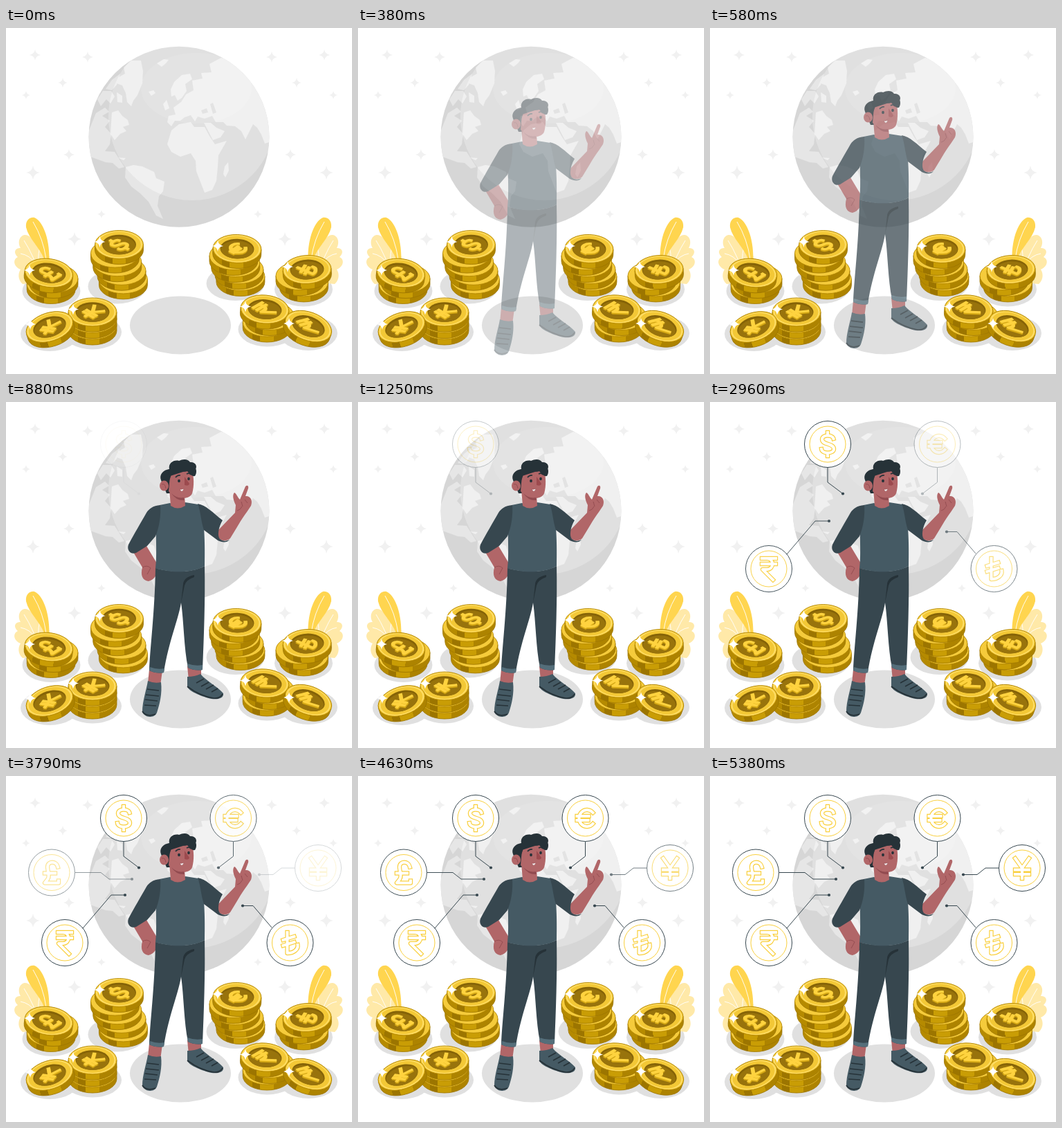
An HTML page that plays this animation: 500 px wide and 500 px high, repeating every 5.5 s.

```html
<!DOCTYPE html>
<html lang="en">
<head>
<meta charset="utf-8">
<title>World currencies</title>
<style>
html, body { margin: 0; width: 100%; height: 100%; overflow: hidden; background: #fff; }
svg { display: block; width: 100vw; height: 100vh; }
</style>
</head>
<body>
<svg viewBox="0 0 500 500">
  <defs>
    <clipPath id="ball"><circle cx="250" cy="157.300" r="130.500"/></clipPath>
    <linearGradient id="side">
      <stop offset=".2" stop-color="#b58a00"/>
      <stop offset=".2" stop-color="#9c7500"/><stop offset=".36" stop-color="#9c7500"/>
      <stop offset=".36" stop-color="#c99d05"/><stop offset=".64" stop-color="#c99d05"/>
      <stop offset=".64" stop-color="#ad8300"/>
    </linearGradient>
    <marker id="dot" viewBox="-3 -3 6 6" markerWidth="6" markerHeight="6"><circle r="2.100" fill="#37474f"/></marker>
    <g id="leaf">
      <path d="M24 370C16 363 18 353 21 349C10 344 10 334 17 331C10 324 13 318 21 318C16 309 20 300 27 299C35 299 39 306 42 312C49 307 56 314 53 322C63 324 66 335 60 342L62 366Z" fill="#ffe9a8"/>
      <path d="M26 307Q40 329 50 360M21 326Q34 328 43 341M50 314Q46 324 47 340" fill="none" stroke="#fff" stroke-width=".9"/>
      <path d="M55 334C49 317 33 305 29 288C28 278 34 273 41 274C52 278 63 302 62.500 334Z" fill="#ffd54f"/>
      <path d="M39 280Q54 305 58 334" fill="none" stroke="#fff" stroke-width=".9"/>
    </g>
  </defs>
  <g id="stars"></g>
  <g clip-path="url(#ball)">
    <rect x="119" y="26" width="263" height="263" fill="#e0e0e0"/>
    <path fill="#f0f0f0" d="M161 72L172 66L170 57L181 47L195 47L198 62L197 80L190 97L184 105L181 113L175 107L173 94L168 83L160 80Z
      M218 51L228 45L235 46L231 51L225 56ZM206 92L213 90L216 94L210 98ZM144 88L153 75L165 66L160 82L153 90Z
      M132 103L140 91L152 91L157 99L151 109L145 103L137 113ZM160 93L168 98L168 108L161 107Z
      M153 122L162 119L168 127L176 133L178 140L169 143L174 149L165 153L157 162L151 153Z
      M119 150L130 123L143 115L149 121L139 127L150 134L143 143L152 153L150 168L143 178L157 179L171 201L163 203L154 195L144 194L119 185Z
      M160 187L173 188L170 191ZM173 201L184 198L197 200L214 208L217 217L229 222L227 236L221 243L219 257L227 276L217 271L206 251L194 239L181 229L172 216Z
      M238 89L243 78L254 68L266 66L269 74L259 81L261 91L254 101L248 105L244 97L239 99ZM227 110L232 104L236 116L230 119Z
      M233 136L235 127L245 125L242 115L253 107L260 96L271 90L269 76L284 73L282 65L297 64L294 52L311 43L340 50L390 110L383 164L374 167L369 154L363 144L357 139L351 151L346 161L340 149L331 142L319 141L314 136L303 136L298 127L287 131L277 128L273 135L267 126L258 129L252 134L244 134L239 142Z
      M239 148L250 139L267 136L272 143L287 143L294 156L302 168L319 163L307 184L306 201L304 221L298 234L287 238L280 220L275 207L274 192L267 181L252 186L239 179L233 168Z
      M286 137L296 137L304 144L316 149L310 158L299 162ZM321 194L322 206L317 216L314 211L316 200Z"/>
    <path d="M282 119L290 116L292 122L284 124ZM295 110L299 108L304 122L299 124Z" fill="#e0e0e0"/>
    <path d="M119 26H382V289H119ZM148 128A121 121 0 0 0 390 128A121 121 0 0 0 148 128Z" fill="#000" opacity=".045" fill-rule="evenodd"/>
    <ellipse cx="275" cy="87" rx="80" ry="51" fill="#fff" opacity=".1"/>
  </g>
  <ellipse cx="252" cy="429.500" rx="73" ry="42" fill="#e0e0e0"/>
  <g id="shadows" fill="#e0e0e0"></g>
  <use href="#leaf"/>
  <use href="#leaf" transform="translate(499) scale(-1 1)"/>
  <g id="coins"></g>
  <g id="badges"></g>
  <g id="man" opacity="0">
    <g fill="#b16668">
      <path d="M207 386L226 388L223 410L205 407ZM262 382L282 382L282 399L264 402Z"/>
      <path d="M184 217L203 208L218 233C222 244 217 256 206 259C197 258 194 250 197 239Z"/>
      <path d="M306 186L331 160L332 149C328 141 327 134 330 131C333 132 334 137 338 141L346 122C349 119 351 122 350 125L346 136C353 135 357 142 354 150L348 159C339 171 333 183 324 197C318 203 306 200 306 193Z"/>
    </g>
    <path d="M197 239Q204 235 209 240L204 249M340 144L342 151M345 141L349 146M334 157Q339 156 341 151" fill="none" stroke="#924b50" stroke-width=".9"/>
    <path d="M205 403Q214 407 224 405C226 421 222 437 218 449C214 458 200 456 197 448C197 432 203 416 205 403ZM262 397Q273 397 281 393C290 404 306 411 314 421C315 429 305 430 297 429C284 426 266 419 262 412Z" fill="#455a64"/>
    <path d="M204 415L221 417M202 423L221 425M201 430L219 432M200 438L217 439M275 406L286 400M282 411L293 405M289 415L300 409M297 419L306 414M262 411Q280 425 300 428Q309 429 313 422M197 447Q203 456 216 451" fill="none" stroke="#263238" stroke-width="1.700"/>
    <path d="M216 240C236 246 267 248 287 237C288 285 286 340 284 387Q273 389 263 384C257 355 257 317 253 290C249 315 235 346 228 391Q217 393 207 388C208 356 215 305 216 240Z" fill="#37474f"/>
    <path d="M208 383Q218 387 229 385L228 391Q217 393 207 388ZM262 378Q273 382 284 380V387Q273 389 263 384Z" fill="#546e7a"/>
    <path d="M272 250Q257 253 256 263L253 290L258 265Q260 257 272 253Z" fill="#263238"/>
    <path d="M222 149L237 146Q249 153 259 145L278 148C286 156 288 195 287 237C269 248 235 247 216 240C219 220 215 180 218 157Z" fill="#455a64"/>
    <path d="M223 149C212 150 207 154 203 160C195 174 185 191 177 206C174 214 180 221 188 218L204 208L216 194C222 180 224 163 223 149ZM277 147C289 149 299 160 313 171C307 181 305 193 309 198Q315 203 323 199C319 204 312 203 306 200L286 185C282 174 281 156 277 147Z" fill="#37474f"/>
    <path d="M224 113C221 105 227 98 236 97C234 88 243 83 250 85C256 82 263 82 266 87C273 86 277 92 274 97L266 112L240 132L232 132Z" fill="#263238"/>
    <g fill="#b16668">
      <path d="M236 126L258 135L259 150Q248 157 238 150Z"/>
      <path d="M237 107L268 97C272 107 272 122 269 132C266 140 253 141 243 136L235 129Z"/>
      <ellipse cx="228.500" cy="121" rx="6.500" ry="7.500"/>
    </g>
    <path d="M239 132Q247 140 257 138L258 142Q246 143 239 132Z" fill="#924b50"/>
    <path d="M235 116L234 98L262 86L271 93C276 95 276 103 273 107C269 108 265 104 262 100C256 103 253 96 247 101C243 103 239 102 238 108Z" fill="#263238"/>
    <path d="M258 108L265 118Q264 122 258 120Z" fill="#9c4a4e"/>
    <path d="M225 119Q230 117 231 125" fill="none" stroke="#924b50"/>
    <path d="M245 109Q248 105 252 106M261 104Q265 102 267 105" fill="none" stroke="#263238" stroke-width="1.700"/>
    <ellipse cx="250" cy="114" rx="1.900" ry="2.300" fill="#263238"/>
    <ellipse cx="264" cy="111" rx="1.800" ry="2.200" fill="#263238"/>
    <path d="M251 126Q254 127 257 125Q256 130 253 129Z" fill="#fff" stroke="#924b50" stroke-width=".6"/>
  </g>
</svg>
<script>
const LOOP = 5500, RISE = 880, FADE = 1800, FIRST = 830, STEP = 535;
const $ = id => document.getElementById(id);

const signs = {
  dollar: 'M8.500 -8C7 -14 -8 -14.500 -8 -7C-8 1.500 9 -2 9 7C9 14 -8 14.500 -9 7M0 -17V-13M0 13V17',
  euro: 'M11 -8A11.500 12 0 1 0 11 8M-12 -3H5M-12 3H4',
  pound: 'M9 -8C7 -17 -6 -17 -6 -8C-6 -2 -2 5 -6 10L-10 15H10V12M-10 1H5',
  yen: 'M-10 -14L0 0L10 -14M0 0V15M-10 2.500H10M-10 9H10',
  rupee: 'M-10 -15H10M-10 -7H10M-10 -15H-3C8 -15 8 1 -3 1H-9L6 16',
  lira: 'M-4 -15V15C6 15 12 9 11 3M-10 -4L6 -9M-10 4L6 -1'
};

const sign = (name, color, width) =>
  `<path d="${signs[name]}" fill="none" stroke="${color}" stroke-width="${width}" stroke-linecap="square" stroke-linejoin="round"/>`;

const spark = (x, y, r, fill) =>
  `<path transform="translate(${x} ${y}) scale(${r})" fill="${fill}" d="M0 -1Q.13 -.13 1 0Q.13 .13 0 1Q-.13 .13 -1 0Q-.13 -.13 0 -1Z"/>`;

// The right half of the sky mirrors the left one.
const sky = [[42, 39, 8], [118, 42, 8], [82, 79, 7], [29, 97, 6], [91, 183, 8], [39, 209, 10], [138, 269, 6], [99, 305, 10]];
$('stars').innerHTML = sky.map(([x, y, r]) =>
  spark(x, y, r, '#f1f1f1') + spark(502 - x, y, r, '#f1f1f1')).join('');

function coin(x, y, name, tilt = 0, spin = 0) {
  const rx = 35, ry = 20.5, h = 8;
  const ring = (k, fill, extra = '') => `<ellipse rx="${rx * k}" ry="${ry * k}" fill="${fill}" ${extra}/>`;
  const flat = `scale(.92 ${.92 * ry / rx}) rotate(${spin})`;
  const face = name ? ring(.95, '#ffdf6b') + ring(.9, '#f3c836') + ring(.7, '#856307') +
    `<ellipse cy="1.500" rx="${rx * .67}" ry="${ry * .63}" fill="#98730c"/>` +
    `<g transform="translate(0 2) ${flat}">${sign(name, '#d6a915', 6)}</g>` +
    `<g transform="${flat}">${sign(name, '#ffd33f', 6)}</g>` : '';
  return `<g transform="translate(${x} ${y}) rotate(${tilt})">
    <path d="M${-rx} 0V${h}A${rx} ${ry} 0 0 0 ${rx} ${h}V0Z" fill="url(#side)" stroke="#9c7500" stroke-width=".8"/>
    ${ring(1, '#f5cb3b', 'stroke="#b28600" stroke-width=".9"')}${face}</g>`;
}

// x and y are the top coin's centre; lean shifts the coins below it.
const stacks = [
  { x: 62, y: 354, n: 3, gap: 8, lean: 7, name: 'pound', tilt: 8, spin: -55 },
  { x: 163.5, y: 313, n: 5, gap: 12.6, lean: -6, name: 'dollar', tilt: 0, spin: -50 },
  { x: 125, y: 410.5, n: 3, gap: 9.5, lean: 0, name: 'yen', tilt: 0, spin: 45 },
  { x: 63, y: 432, n: 1, gap: 0, lean: 0, name: 'yen', tilt: -18, spin: 40 },
  { x: 334, y: 319, n: 5, gap: 10, lean: -5, name: 'euro', tilt: 2, spin: -50 },
  { x: 435, y: 349, n: 3, gap: 9.2, lean: -10, name: 'lira', tilt: -3, spin: -50 },
  { x: 374, y: 406.5, n: 3, gap: 9.5, lean: 7, name: 'rupee', tilt: 5, spin: -50 },
  { x: 437, y: 431, n: 1, gap: 0, lean: 0, name: 'rupee', tilt: 20, spin: -50 }
];

function stack({ x, y, n, gap, lean, name, tilt, spin }) {
  let out = '';
  for (let i = n - 1; i > 0; i--) out += coin(x + lean * Math.cos(1.1 * (i - 1)), y + gap * i);
  return out + coin(x, y, name, tilt, spin) + spark(x - 28, y - 4, 8, '#fff');
}

$('shadows').innerHTML = stacks.map(s =>
  `<ellipse cx="${s.x + s.lean / 2}" cy="${s.y + s.gap * (s.n - 1) + 10}" rx="42" ry="25"/>`).join('');
$('coins').innerHTML = stacks.map(stack).join('');

// In order of appearance; each line runs from the badge to its dot.
const badges = [
  { name: 'dollar', x: 170, y: 61, line: 'M170 95V116L192 132.500' },
  { name: 'rupee', x: 85, y: 241, line: 'M111 220L152 172H172' },
  { name: 'lira', x: 410.5, y: 241, line: 'M384 219L357 187.500H342' },
  { name: 'euro', x: 328.5, y: 61, line: 'M328.500 95V116L307 132.500' },
  { name: 'pound', x: 66, y: 139.5, line: 'M99 139.500H137L149 149H182' },
  { name: 'yen', x: 451, y: 133, line: 'M417 133H398L386 142.500H366' }
];
$('badges').innerHTML = badges.map(({ name, x, y, line }) => `<g opacity="0">
  <path d="${line}" fill="none" stroke="#37474f" marker-end="url(#dot)"/>
  <g transform="translate(${x} ${y})">
    <circle r="33.500" fill="#fff" stroke="#37474f"/>
    <circle r="26" fill="none" stroke="#f9cf3c"/>
    ${sign(name, '#f9cf3c', 6.4)}${sign(name, '#fff', 4)}
  </g>
</g>`).join('');

const man = $('man'), groups = [...$('badges').children];
const clamp = v => Math.min(1, Math.max(0, v));

function update(t) {
  const p = clamp(t / RISE), rise = p * p * (3 - 2 * p);
  man.setAttribute('opacity', rise);
  man.setAttribute('transform', `translate(0 ${30 * (1 - rise)})`);
  groups.forEach((g, i) => {
    const q = clamp((t - FIRST - STEP * i) / FADE);
    g.setAttribute('opacity', q * (1.3 - .3 * q));
  });
}

const start = performance.now();
function frame() {
  update((performance.now() - start) % LOOP);
  requestAnimationFrame(frame);
}
frame();
</script>
</body>
</html>
```
